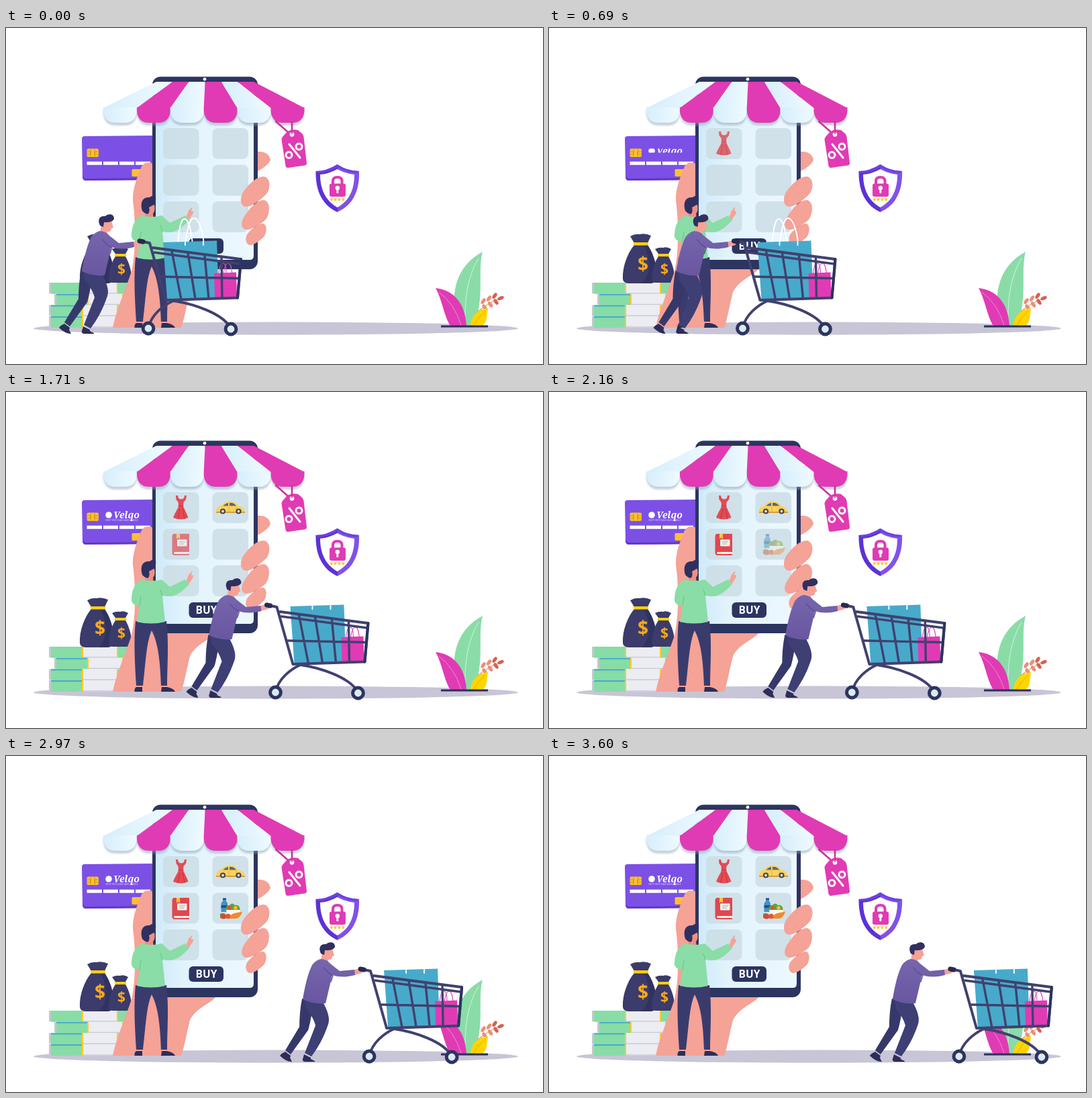
An HTML page that plays this animation: 800 by 500 pixels, repeating every 3.9 s.

```html
<!DOCTYPE html>
<html lang="en">
<head>
<meta charset="utf-8">
<title>Mobile shopping</title>
<style>
  html, body { margin: 0; width: 100%; height: 100%; overflow: hidden; background: #fff; }
  svg { display: block; width: 800px; height: 500px; }
  .line { fill: none; stroke-linecap: round; stroke-linejoin: round; }
  .sum { font: 700 28px "Noto Sans", sans-serif; fill: #fba919; text-anchor: middle; }
  .buy { font: 700 15.5px "Open Sans", sans-serif; fill: #fff; text-anchor: middle; }
  .brand { font: italic 700 14px "Noto Serif", serif; fill: #fff; }
  .motto { font: 3.4px "Open Sans", sans-serif; fill: #e6dcff; }
</style>
</head>
<body>
<svg viewBox="0 0 800 500">
  <defs>
    <linearGradient id="screen"><stop stop-color="#cfeafa"/><stop offset=".3" stop-color="#e2f3fc"/><stop offset="1" stop-color="#edf8fe"/></linearGradient>
    <linearGradient id="cloth"><stop stop-color="#d6eefb"/><stop offset="1" stop-color="#effaff"/></linearGradient>
    <linearGradient id="lilac" x2="0" y2="1"><stop stop-color="#7765ad"/><stop offset="1" stop-color="#6857a0"/></linearGradient>
    <linearGradient id="guard"><stop offset=".5" stop-color="#5c32d6"/><stop offset=".5" stop-color="#8052ea"/></linearGradient>
    <filter id="soft"><feGaussianBlur stdDeviation="1.5"/></filter>
  </defs>

  <ellipse cx="402" cy="447" rx="361" ry="9.5" fill="#c7c5d6"/>

  <!-- books -->
  <g id="books"></g>

  <!-- money bags -->
  <g fill="#3b3b6c">
    <path d="M127 320L121 310Q128 306 135 307Q143 305 152 309L147 320L147 323C157 338 163 360 159 376Q157 380 149 380H120Q111 380 110 374C109 355 117 335 127 323Z"/>
    <path d="M147 323C157 338 163 360 159 376Q157 380 149 380H138C153 367 151 342 141 323Z" fill="#323260"/>
    <path d="M163 336L158 329Q164 326 170 327Q176 325 182 329L178 336L178 340C184 350 188 365 187 375Q186 379 181 379H159Q153 379 153 374C153 360 158 347 163 340Z"/>
    <path d="M126 319H148V323.5H126ZM162 336H179V340H162Z" fill="#fdd00e"/>
  </g>
  <text class="sum" x="140" y="361">$</text>
  <text class="sum" x="172" y="366" style="font-size:21px">$</text>

  <!-- bank card -->
  <path d="M117 161L222 160V226L119 227Q114 227 114 222L113 165Q113 161 117 161Z" fill="#7c50e5"/>
  <path d="M113.8 219Q115 224 120 224L222 223V226L119 227Q114 227 113.8 219Z" fill="#6238c8"/>
  <rect x="120.5" y="179.5" width="17.5" height="12.5" rx="2.5" fill="#fcc02e"/>
  <path class="line" d="M121 184H126V188H121M138 184H132V188H138M126 180V192M132 180V192" stroke="#c78b1c" stroke-width=".8"/>
  <path d="M120.5 201.2H143M145 201.2H167M169 201.2H191M193 201.2H215" stroke="#fff" stroke-width="5"/>
  <rect x="187.5" y="210" width="22" height="11" rx="1.5" fill="#fcc02e"/>
  <g id="brand">
    <circle cx="153" cy="183" r="4.8" fill="#fff"/>
    <text class="brand" x="160" y="187.5">Velqo</text>
    <text class="motto" x="148" y="191.5">SHOP WITH EASE AND A SMILE</text>
  </g>

  <!-- hand and phone -->
  <path d="M159 446C164 420 178 390 187 362C193 335 194 295 189 257C188 240 196 220 202 206Q207 198 217 201L230 210V358H313C304 369 284 374 274 393C269 413 266 432 261 446Z" fill="#f5a297"/>
  <rect x="218" y="72.5" width="157" height="286.5" rx="12" fill="#2c3460"/>
  <path d="M223 82H369V339Q369 345 363 345H229Q223 345 223 339Z" fill="url(#screen)"/>
  <circle cx="296" cy="76.2" r="2.4" fill="#fff"/>
  <g id="tiles" fill="#cbdde5" opacity=".82"></g>

  <!-- goods on the screen -->
  <g class="item">
    <path d="M253 154L256 154L257 158Q261 161 265 158L266 154L269 154L268 160L264.5 164L264 170C267 177 270 182 271.500 187Q260 192 249 187C251 181 255 176 257 170L256.500 164L253.500 160Z" fill="#e34b54"/>
    <path class="line" d="M257 169.5H264M259 174L256 188M263 174L266 188" stroke="#c73843" stroke-width="1.2"/>
  </g>
  <g class="item">
    <path d="M313 179C313 172 316 170 321 169.500C325 163 333 161.500 340 164C343 166 345 168 347 170C353 171 356 174 355 179Z" fill="#fbd25b"/>
    <path d="M323.500 169.500Q327 165.500 331 165V169.500ZM333 165H337Q341 166 343 169.500H333Z" fill="#5a6a78"/>
    <path d="M313 178H356V180H313Z" fill="#d89b3d"/>
    <path d="M332 170V178M343 171V177" stroke="#dda83e" stroke-width=".8"/>
    <g fill="#e9e3d2" stroke="#454651" stroke-width="2.2"><circle cx="323" cy="177.500" r="3"/><circle cx="346.500" cy="177.500" r="3"/></g>
  </g>
  <g class="item">
    <path d="M251 211H273V243H251Q247.5 243 247.5 239V215Q247.5 211 251 211Z" fill="#e0474f"/>
    <path d="M251 238H273V241H251Q249 239.5 251 238Z" fill="#f5efe8"/>
    <path d="M254 211H259V219L256.5 216.5L254 219Z" fill="#fbc544"/>
    <rect x="255" y="219.5" width="14.5" height="10" rx="1" fill="#f7f1ec"/>
    <path d="M258 223H267M258 226H265" stroke="#9aa" stroke-width="1"/>
  </g>
  <g class="item">
    <path d="M323 212H328V216L330 219V232H320.5V219L323 216Z" fill="#4391c9"/>
    <path d="M323 211.5H328V214H323ZM320.5 222H330V226H320.5Z" fill="#274f7e"/>
    <path d="M327 230Q327 221 333 222Q337 217 341 222Q348 220 349 230Z" fill="#55a83b"/>
    <circle cx="333" cy="226" r="2.800" fill="#e64b3c"/><circle cx="342" cy="226" r="2.800" fill="#f4bd35"/>
    <path d="M328 229H349L348 236H329Z" fill="#f8faf6"/>
    <path d="M319 235Q325 232 328 237L326 241H319Z" fill="#469b3b"/>
    <ellipse cx="324" cy="239" rx="4.5" ry="3.5" fill="#dd4636"/>
    <circle cx="331" cy="238.5" r="3.8" fill="#e9552f"/>
    <path d="M334 242Q333 236 340 234L352 231.500Q350 240 343 242Z" fill="#f28a2c"/>
  </g>

  <rect x="272.5" y="313" width="51.5" height="23" rx="6" fill="#2c3460"/>
  <text class="buy" x="298.5" y="330">BUY</text>

  <!-- fingers -->
  <g fill="#f5a297">
    <path d="M375 184Q391 183 394 196Q392 204 375 213Z"/>
    <path d="M354 243C362 232 373 221 384 221C395 223 394 240 388 247C378 257 367 265 358 266C348 265 348 252 354 243Z"/>
    <path d="M353 284C362 268 374 256 384 256C395 258 393 277 387 285C378 293 366 300 358 300C350 299 350 291 353 284Z"/>
    <path d="M360 306C367 298 376 291 383 291C390 293 388 306 384 311C377 317 370 323 363 323C356 321 356 311 360 306Z"/>
  </g>

  <g id="awning"></g>

  <!-- price tag -->
  <path class="line" d="M402 139L419 154M426 140V157" stroke="#cb2f9e" stroke-width="2.5"/>
  <path d="M412 162L419 154Q426 150 435 152L441 157Q443 159 443.5 162L448 201Q448 204 445 204.5L420 208Q417 208 416.5 205L410.5 166Q410.5 164 412 162Z" fill="#e03bb4"/>
  <circle cx="426" cy="158.5" r="3.3" fill="#fff"/>
  <path d="M426 142V158" stroke="#cb2f9e" stroke-width="1.5"/>
  <g class="line" stroke="#fff" stroke-width="3">
    <circle cx="421.5" cy="189" r="4.5"/><circle cx="436.5" cy="176.5" r="4.5"/><path d="M422 173L438 193"/>
  </g>

  <!-- shield -->
  <path d="M493.5 203Q509 213 526 213C527 241 518 263 493.5 274C470 263 461 241 461.5 213Q478 213 493.5 203Z" fill="url(#guard)"/>
  <path d="M461.5 213Q478 213 493.5 203Q509 213 526 213L522 216Q507 215 493.5 207Q480 215 465 216Z" fill="#6e42e0"/>
  <path d="M493.5 210Q506 217 519 218C519 240 512 257 493.5 267C476 257 468 240 468 218Q481 217 493.5 210Z" fill="#fff"/>
  <path class="line" d="M487 234V228Q487 222 493.7 222Q500.5 222 500.5 228V234" stroke="#e03bb4" stroke-width="4"/>
  <rect x="482" y="231.5" width="24" height="19.5" rx="3" fill="#e03bb4"/>
  <path d="M492.4 240H495.2V246H492.4Z" fill="#fff"/><circle cx="493.8" cy="238" r="3.2" fill="#fff"/>
  <g id="stars" fill="#fdc917"></g>

  <!-- plants -->
  <path d="M672 443C663 405 664 358 710 333C702 362 714 402 697 443Z" fill="#8adca7"/>
  <path class="line" d="M684 442C683 405 687 370 704 343" stroke="#d3f3de" stroke-width="1"/>
  <path class="line" d="M703 422Q714 412 738 401" stroke="#e39a84" stroke-width="1.3"/>
  <g id="sprig"></g>
  <path d="M686 443H662C653 430 650 405 640 387C666 390 684 408 686 443Z" fill="#e03bb4"/>
  <path class="line" d="M645 393Q668 410 678 442" stroke="#f08ad3" stroke-width="1"/>
  <path d="M692 443C694 425 705 418 718 417C716 430 717 440 709 443Z" fill="#ffd500"/>
  <path class="line" d="M697 442Q704 430 714 421" stroke="#e2ae00" stroke-width="1"/>
  <path d="M648 442.5H718V445.5H648Z" fill="#2c3058"/>

  <!-- shopper at the phone -->
  <path d="M193 341H239C243 375 240 410 240 437H231C230 410 228 375 217 355C209 372 208 405 204 437H194C192 405 190 370 193 341Z" fill="#3a3b6d"/>
  <path d="M194 439H203L203 446H191.5Q191 441 194 439ZM232 439H240Q250 441 252 446H231Z" fill="#2d2e58"/>
  <path d="M208 265L221 263Q223 272 219 276L220 286H207Z" fill="#ee8f83"/>
  <path d="M268 283L272 272L277 266.5Q278 268 275.5 272Q281 272 278 277L272 286Z" fill="#f5a297"/>
  <path d="M203 279Q218 283 232 279L244 290L267 279L273 286C263 297 253 305 240 304L233 303L237 342Q216 347 195 342L199 318Q189 318 187 311C187 298 190 284 203 279Z" fill="#8adda6"/>
  <path class="line" d="M199 318L201 304M233 303L230 294" stroke="#6cc78d" stroke-width="1.2"/>
  <path d="M203 272C199 259 204 251 214 252Q219 248 223 251Q224 260 220 263L213 267Q215 274 211 277Q206 276 203 272Z" fill="#2f3060"/>

  <!-- shopper with the trolley -->
  <g id="mover">
    <path d="M87 440L95 446L94 449L97 455Q88 455 79 446Q82 442 87 440ZM115 444L125 449L125 451L131 454V455H116Q112 454 113 451Z" fill="#2d2e58"/>
    <path d="M112 361L131 366C126 380 125 396 121 408L95 444L87 438L108 403C108 390 109 375 112 361Z" fill="#37386a"/>
    <path d="M115 362L142 364C150 379 154 390 151 399C144 420 135 435 126 447L116 442L132 401C130 393 125 384 118 376Z" fill="#3e3f75"/>
    <path d="M142 290L157 287L160 297L157 298Q157 304 151 303L150 309L140 306Z" fill="#f5a297"/>
    <path d="M140 294C136 285 139 279 148 280C152 276 161 276 161 284Q159 290 146 289L145 296Z" fill="#2f3060"/>
    <path d="M186 320L193 317L202 317Q204 320 201 323L190 326Z" fill="#f5a297"/>
    <path d="M140 302Q150 303 154 309L168 320L190 318L191 326Q172 331 157 326L147 368Q130 370 113 362C116 344 120 325 127 311Q132 304 140 302Z" fill="url(#lilac)"/>
    <path class="line" d="M144 315Q151 324 158 327L155 336" stroke="#574690" stroke-width="1.2"/>

    <path class="line" d="M256 322C257 305 260 284 266 284C272 284 277 305 278 322M267 322C269 305 273 283 280 283C287 283 293 303 295 322" stroke="#fff" stroke-width="1.9"/>
    <path d="M234 319L314 316.5L317 402L240 404Z" fill="#47aacb"/>
    <path class="line" d="M267 319V323M294 318V323" stroke="#fff" stroke-width="2"/>
    <path class="line" d="M317 366C318 355 320 350 323 350C327 350 328 358 328 366M324 366C325 356 328 350 331 350C335 350 336 358 337 366" stroke="#df4fb9" stroke-width="1.2"/>
    <path d="M310 365L343 363.5L344 400L311 402Z" fill="#e03bb4"/>

    <g class="line" stroke="#40416f">
      <path d="M200 317L214 320L238 405L345 401.5L350 344L219 327" stroke-width="4"/>
      <path d="M221 334L348 351M230 370L347 372.5M247 332L261 404M271 335L282 403M296 339L302 403M321 342L322 402" stroke-width="3.4"/>
      <path d="M249 406C234 413 217 426 212 446M249 406C277 410 323 424 335 447" stroke-width="3.8"/>
      <path d="M199 317L204 318" stroke="#282a50" stroke-width="7"/>
      <path d="M345 401.5L350 344" stroke="#2c3460" stroke-width="4"/>
    </g>
    <g fill="#d9ebf0" stroke="#2c3460" stroke-width="5"><circle cx="212" cy="447" r="7.900"/><circle cx="335" cy="448" r="7.900"/></g>
  </g>
</svg>

<script>
const $ = id => document.getElementById(id);
const add = (id, list) => $(id).innerHTML = list.join('');
const range = n => [...Array(n).keys()];
const rect = (x, y, w, h, fill) => `<rect x="${x}" y="${y}" width="${w}" height="${h}" fill="${fill}"/>`;

add('books', range(4).map(i => {
  const x = i === 1 ? 75 : 67, y = 379 + i * 16.7;
  return rect(x - 3, y, 5, 16, '#c3c8d0') + rect(x, y, 47, 16.7, '#88dca5') +
    rect(x + 48, y, 52, 16.7, '#ececf3') + rect(x + 46, y, 2, 16.7, '#fccb23') +
    rect(x + 98, y, 2, 16.7, '#fccb23') + rect(x + 100, y, 16, 16.7, '#88dca5') +
    (i ? rect(x, y, 46, 2, '#44a9cd') : '') + rect(x + 48, y + 15, 50, 1.5, '#c9cad8');
}));

add('tiles', range(6).map(i =>
  `<rect x="${234 + i % 2 * 73.5}" y="${149 + (i >> 1) * 54.5}" width="53.5" height="46" rx="8"/>`));

const scallop = x => `M${x} 118H${x + 50}V124Q${x + 48} 141 ${x + 32} 141H${x + 18}Q${x + 2} 141 ${x} 124Z`;
add('awning', [
  ...range(6).map(i => `<path d="${scallop(145 + i * 49.9)}" transform="translate(0 4)" fill="#8ba0b4" opacity=".5" filter="url(#soft)"/>`),
  ...range(6).map(i => {
    const top = 224 + i * 24.2, x = 145 + i * 49.9;
    const fill = i % 2 ? '#e03bb4' : 'url(#cloth)';
    return `<path d="M${top} 80H${top + 24.2}L${x + 50} 119H${x}Z" fill="${fill}"/>` +
      `<path d="${scallop(x)}" fill="${fill}"/>`;
  })
]);

const star = (cx, cy) => '<path d="M' + range(10).map(i => {
  const r = i % 2 ? 1.4 : 3, a = i * Math.PI / 5;
  return `${(cx + r * Math.sin(a)).toFixed(2)} ${(cy - r * Math.cos(a)).toFixed(2)}`;
}).join('L') + 'Z"/>';
add('stars', range(4).map(i => star(484.8 + i * 5.8, 255.3)));

add('sprig', range(7).map(i => {
  const k = i >> 1, side = i % 2 ? 1 : -1, end = i === 6;
  const x = end ? 737 : 712 + k * 8.5 + side, y = end ? 402 : 411 - k * 4 + side * 4.5;
  return `<ellipse cx="${x}" cy="${y}" rx="5" ry="2.6" fill="${k > 1 ? '#d9604f' : '#e88f76'}" transform="rotate(${end ? -25 : side * 55} ${x} ${y})"/>`;
}));

const LOOP = 3900, STOP = 3600, STEP = 30, SPEED = 0.1108;
const items = document.querySelectorAll('.item');
const part = (t, from, length) => Math.min(1, Math.max(0, (t - from) / length));

function draw(now) {
  const t = Math.min(STOP, Math.floor(now % LOOP / STEP) * STEP);
  $('mover').setAttribute('transform', `translate(${t * SPEED} 0)`);
  items.forEach((el, i) => el.style.opacity = part(t, 300 + i * 550, 470));
  const shut = 50 * (1 - part(t, 450, 800));
  $('brand').style.clipPath = `inset(${shut}% 0)`;
}

const start = performance.now();
(function tick() {
  draw(performance.now() - start);
  requestAnimationFrame(tick);
})();
</script>
</body>
</html>
```
